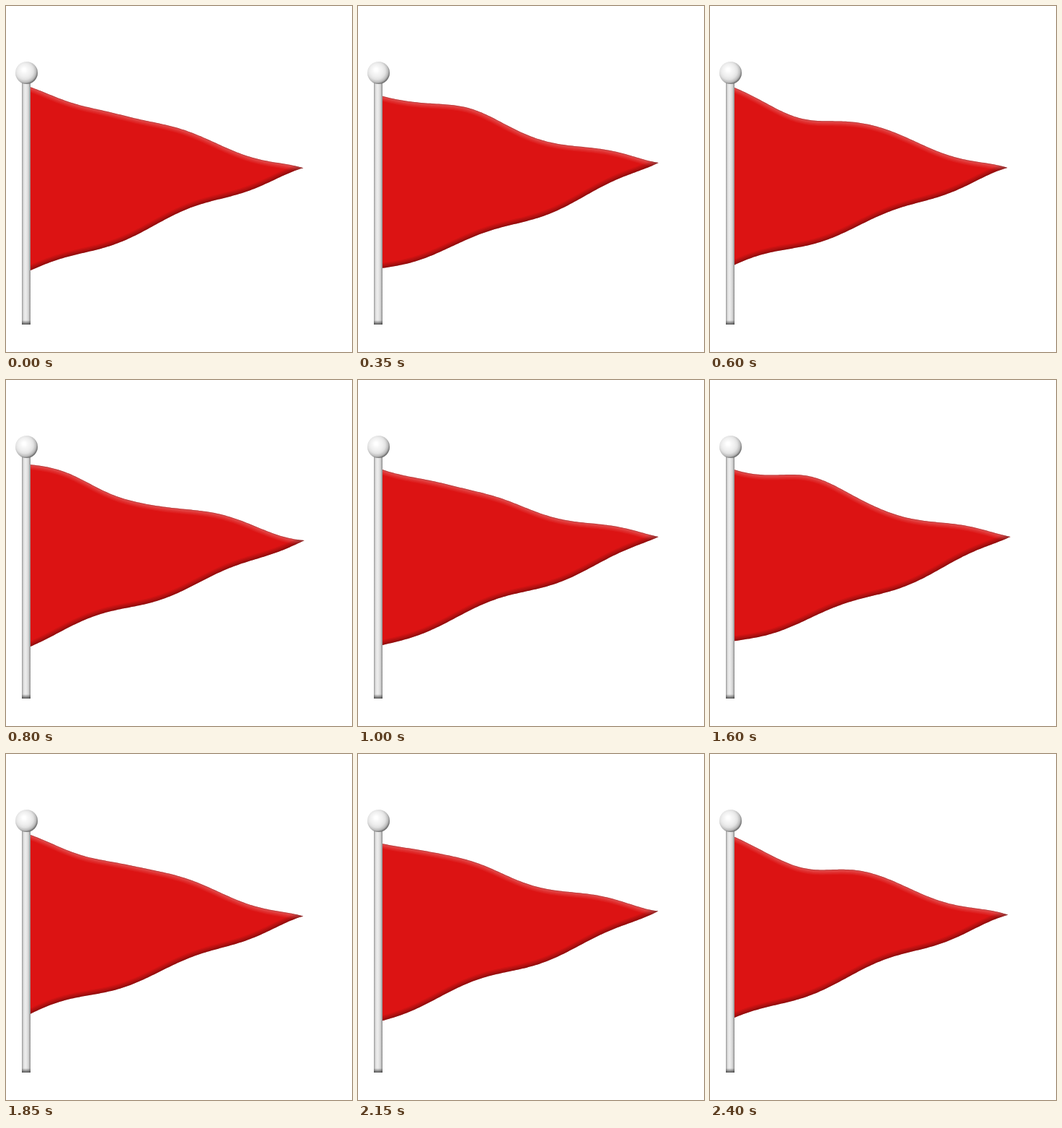
These frames come from a looping animation (480 by 479 pixels, 2450 ms). An HTML page with a canvas:

```html
<!DOCTYPE html>
<html>
<head>
<meta charset="utf-8">
<style>
html, body { margin: 0; overflow: hidden; background: #fff; }
canvas { display: block; }
</style>
</head>
<body>
<canvas id="stage" width="480" height="479"></canvas>
<script>
const ctx = document.getElementById('stage').getContext('2d');
const LOOP = 2450, STEP = 50, POLE = 34, SEGMENTS = 128;
const TIP = { x: 414.5, y: 221 };

const mix = (a, b, s) => a + (b - a) * s;
const wave = cycles => Math.cos(2 * Math.PI * cycles);

// u runs from 0 at the pole to 1 at the tip, p from 0 to 1 over the loop.
// Each edge carries a quick ripple, a slower swell and a steady sag.
const edges = {
  top: {
    start: 118,
    ripple: (u, p) => 6.5 * wave(4 * p - 1.7 * u - 0.58)
      - 8 * Math.exp(-(((u - 0.28) / 0.15) ** 2)) * wave(1.5 * p - 0.7 * (u - 0.25))
      + 3.5 * u
  },
  bottom: {
    start: 364,
    ripple: (u, p) => 4.5 * wave(4 * p - 2 * u - 0.34)
      + 4 * (1 - u) * wave(2 * p - 0.8 * (u - 0.1))
      + 4 * Math.sin(Math.PI * u) + 1
  }
};
const tipRipple = p => 4 * wave(4 * p - 0.1);

function edgePoints({ start, ripple }, p) {
  const sway = tipRipple(p), tipX = TIP.x - 0.6 * sway;
  return Array.from({ length: SEGMENTS + 1 }, (_, i) => {
    const u = i / SEGMENTS;
    return [mix(POLE, tipX, u), mix(start, TIP.y, u) + mix(ripple(u, p), sway, u ** 8)];
  });
}

function trace(points) {
  const path = new Path2D();
  points.forEach(([x, y]) => path.lineTo(x, y));
  return path;
}

// Stacked strokes, densest at the edge
function bevel(path, depth, color) {
  ctx.strokeStyle = color;
  for (let i = 1; i <= 8; i++) {
    ctx.lineWidth = 2 * depth * (i / 8) ** 1.5;
    ctx.stroke(path);
  }
}

function drawFlag(p) {
  const top = edgePoints(edges.top, p), bottom = edgePoints(edges.bottom, p);
  const shape = trace([...top, ...bottom.slice().reverse()]);
  const upper = trace(top);
  ctx.save();
  ctx.fillStyle = '#dc1313';
  ctx.fill(shape);
  ctx.clip(shape);
  bevel(upper, 7, 'rgba(255,255,255,0.045)');
  bevel(trace(bottom), 7, 'rgba(0,0,0,0.06)');
  ctx.strokeStyle = 'rgba(90,20,20,0.3)';
  ctx.lineWidth = 2;
  ctx.stroke(upper);
  ctx.restore();
}

// Evenly spaced colours along a gradient
function shade(gradient, ...colors) {
  colors.forEach((color, i) => gradient.addColorStop(i / (colors.length - 1), color));
  ctx.fillStyle = gradient;
}

function drawPole() {
  shade(ctx.createLinearGradient(22, 0, 34, 0), '#989898', '#dcdcdc', '#eee', '#e4e4e4', '#ccc', '#888');
  ctx.fillRect(22, 100, 12, 341);
  shade(ctx.createLinearGradient(0, 435, 0, 441), 'rgba(60,60,60,0)', 'rgba(60,60,60,0.85)');
  ctx.fillRect(22, 435, 12, 6);
  shade(ctx.createRadialGradient(25, 88, 2, 26.5, 90.5, 19), '#fff', '#f6f6f6', '#efefef', '#e2e2e2', '#bbb', '#4a4a4a');
  ctx.beginPath();
  ctx.arc(28.5, 92.5, 15.5, 0, 2 * Math.PI);
  ctx.fill();
}

function draw() {
  const t = Math.floor(performance.now() % LOOP / STEP) * STEP;
  ctx.clearRect(0, 0, 480, 479);
  drawFlag(t / LOOP);
  drawPole();
  requestAnimationFrame(draw);
}
draw();
</script>
</body>
</html>
```
